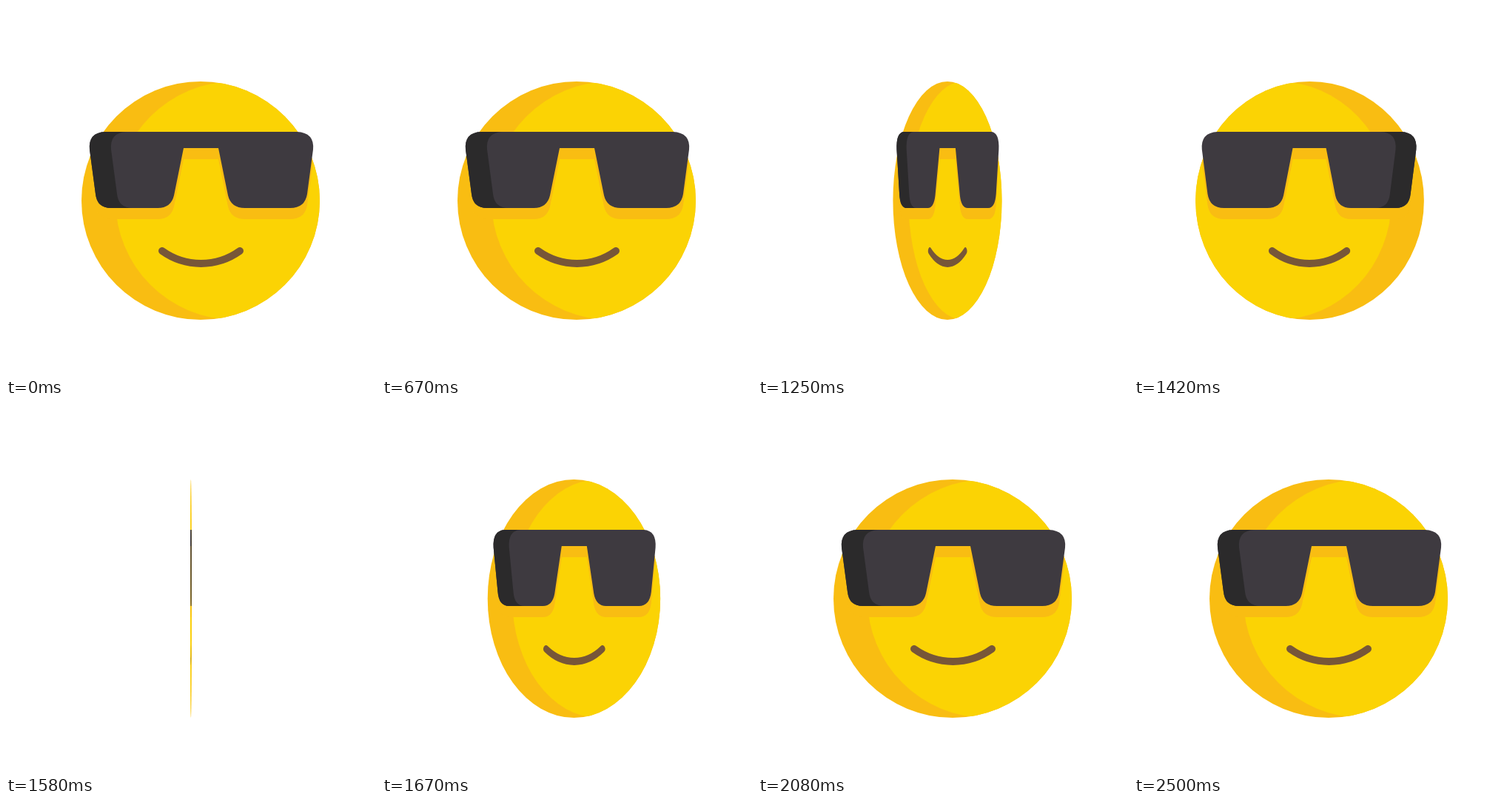
These frames come from a looping animation (500x500 px, 2.58 s). An HTML page:

```html
<!DOCTYPE html>
<html lang="en">
<head>
<meta charset="utf-8">
<title>Spinning cool face</title>
<style>
  html, body { margin: 0; width: 100%; height: 100%; overflow: hidden; background: #fff; }
  svg { display: block; width: 100%; height: 100%; }
  .skin { fill: #fbd304; }
  .shade { fill: #f9bd12; }
  .lens { fill: #3e3a40; }
  .rim { fill: #2b2a2b; }
  .smile { fill: none; stroke: #775638; stroke-width: 10; stroke-linecap: round; }
</style>
</head>
<body>
<svg viewBox="0 0 500 500">
  <defs>
    <circle id="disc" cx="263" cy="263" r="161"/>
    <clipPath id="face"><use href="#disc"/></clipPath>
    <path id="glasses" d="M134 170H393Q417 171 415 194L407 254Q404 273 384 273H323Q304 273 300 256L287 192H240L227 256Q223 273 205 273H142Q123 273 121 254L113 194Q111 171 134 170Z"/>
  </defs>
  <g id="head">
    <use href="#disc" class="shade"/>
    <g clip-path="url(#face)">
      <circle class="skin" cx="309" cy="263" r="161"/>
      <use href="#glasses" class="shade" y="15"/>
    </g>
    <use href="#glasses" class="lens"/>
    <path class="rim" d="M134 170H163Q140 171 142 194L150 254Q152 273 171 273H142Q123 273 121 254L113 194Q111 171 134 170Z"/>
    <path class="smile" d="M211 331A90 90 0 0 0 316 331"/>
  </g>
</svg>
<script>
  const head = document.getElementById('head');
  const LOOP = 2580, STEP = 1000 / 12;
  const FIRST = 10, LAST = 24, MIDDLE = 17.31;
  const stepStart = k => Math.round(k * STEP / 10) * 10;

  // Twelve held poses per second
  function stepAt(ms) {
    let k = Math.floor(ms / STEP) + 1;
    while (stepStart(k) > ms) k--;
    return k;
  }

  // One full turn: steady through the middle, soft at both ends
  function widthAt(step) {
    if (step <= FIRST || step >= LAST) return 1;
    const d = (step - MIDDLE) * 0.2961;
    const n = d < 0 ? 4 : 5.3;
    const turn = d / Math.pow(1 + Math.pow(Math.abs(d), n), 1 / n);
    return -Math.cos(turn * Math.PI);
  }

  function draw() {
    const w = widthAt(stepAt(performance.now() % LOOP));
    head.setAttribute('transform', `translate(250) scale(${w} 1) translate(-250)`);
    requestAnimationFrame(draw);
  }
  draw();
</script>
</body>
</html>
```
